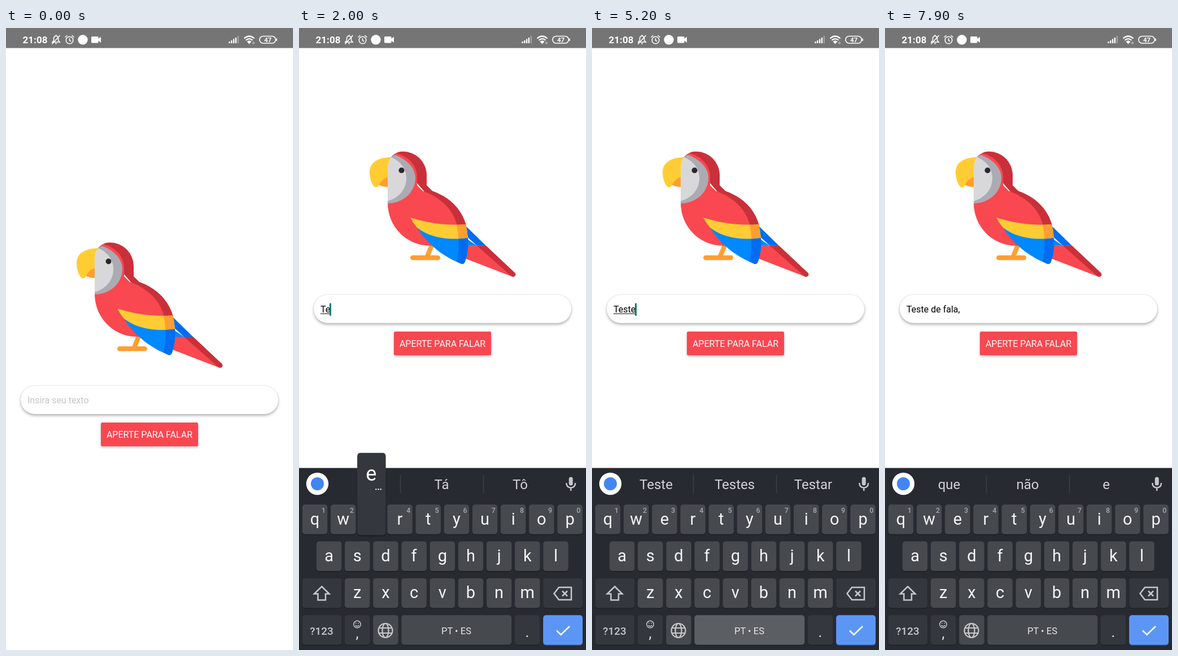
An HTML page that plays this animation: 508 by 1102 pixels, repeating every 8000 ms.

```html
<!DOCTYPE html>
<html lang="pt">
<head>
<meta charset="utf-8">
<title>Papagaio</title>
<style>
  html, body { margin: 0; width: 100%; height: 100%; overflow: hidden; background: #fff; }
  body { position: relative; font-family: Roboto, "Noto Sans", sans-serif; }
  svg { position: absolute; left: 0; top: 0; display: block; overflow: hidden; }
  #app { position: absolute; left: 0; top: 0; width: 508px; height: 1102px; }
  #field {
    position: absolute; left: 26px; top: 634px; width: 455.5px; height: 50px; box-sizing: border-box;
    padding-left: 12px; border-radius: 25px; background: #fff; white-space: pre;
    font-size: 16px; line-height: 52px; color: #000;
    box-shadow: 0 3px 5px rgba(0,0,0,.27), 0 0 3px rgba(0,0,0,.14);
  }
  #composing { text-decoration: underline 1px; text-underline-offset: 2px; }
  #hint { color: #c5c5c5; }
  #caret { position: absolute; top: 15px; width: 2.6px; height: 22px; background: #0b7d72; }
  #button {
    position: absolute; left: 168px; top: 698.5px; width: 172px; height: 42.5px; border-radius: 2.5px;
    background: #f94750; color: #fff; font-size: 16px; line-height: 43px; text-align: center; white-space: nowrap;
    box-shadow: 0 2px 4px rgba(0,0,0,.28);
  }
  text { text-anchor: middle; }
  .letter { font-size: 29px; fill: #f4f5f6; }
  .digit { font-size: 12.5px; font-weight: 500; fill: #a6a9ae; }
  .word { font-size: 24px; fill: #d0d2d5; }
  .line { fill: none; stroke: #c6c8cb; stroke-width: 2.5; }
  .white { fill: none; stroke: #fff; stroke-width: 1.6; }
</style>
</head>
<body>
<div id="app">
  <svg width="508" height="640">
    <!-- tail -->
    <path fill="#f94850" d="M290 547H331L382 595Q385 601 378 602L290 568Z"/>
    <path fill="#c9303a" d="M315 547H331L382 595Q385 598 382 601Q379 603 376 601Z"/>
    <path fill="#0088ff" d="M290 530L315 547H290Z"/>
    <path fill="#006df0" d="M292 509L331 547H315L292 526Z"/>
    <!-- leg -->
    <path fill="#ff9f30" d="M231 545H240L231 567H222Z"/>
    <rect fill="#ff9f30" x="197" y="564" width="53" height="8.6" rx="4.3"/>
    <!-- body -->
    <path fill="#c9303a" d="M163 390C169 383 176 380 184 380A42 42 0 0 1 226 422V440L236 450C267 461 288 482 296 511L280 520L170 390Z"/>
    <path fill="#f94850" d="M157 471C157 513 190 547 232 547H265L280 512C273 482 250 461 219 450L209 440V424C209 405 193 388 172 383Q167 386 162 391L157 440Z"/>
    <!-- face -->
    <path fill="#acabb3" d="M157 472C184 472 206 452 206 427C206 409 191 394 170 386Q165 388 162 391L157 440Z"/>
    <path fill="#d8d8da" d="M157 468V410C157 401 159 395 163 390C180 397 190 411 190 427C190 447 177 462 157 468Z"/>
    <circle fill="#29292c" cx="181.5" cy="413.5" r="5"/>
    <!-- beak -->
    <path fill="#ff9f30" d="M157 424C149 427 144 432 141 439Q149 443 157 443Z"/>
    <path fill="#ffcd33" d="M163 390C140 391 125 399 125 417C125 427 128 435 132 441Q136 446 141 441C144 433 150 427 157 425.500V410Q157 398 163 390Z"/>
    <!-- wing -->
    <path fill="#0088ff" d="M208 514C232 533 265 537 299 533C300 548 299 560 294 575Q291 582 285 578C255 566 228 545 208 514Z"/>
    <path fill="#006df0" d="M282 534L299 533C300 548 299 560 294 575Q291 582 285 578L279 575C282 562 283 550 282 534Z"/>
    <path fill="#ffcd33" d="M197 497C228 507 262 512 295 509Q298 520 299 533C265 538 232 533 209 515Q202 507 197 497Z"/>
    <path fill="#ff9f30" d="M279 510.500L295 509Q298 520 299 533L282 534.800Q282 522 279 510.500Z"/>
  </svg>
  <div id="field"><span id="done"></span><span id="composing"></span><span id="hint">Insira seu texto</span><i id="caret"></i></div>
  <div id="button">APERTE PARA FALAR</div>
</div>

<svg width="508" height="36">
  <rect width="508" height="35.500" fill="#757575"/>
  <text x="51.500" y="27" font-size="17" font-weight="600" fill="#fff">21:08</text>
  <!-- muted bell -->
  <path class="white" d="M82 25H95L92.500 22V18Q92 14.500 88.500 14Q85 14.500 84.500 18V22ZM88.500 14V12M87 27.500H90M95.500 13L81.500 28.500"/>
  <!-- alarm -->
  <circle class="white" cx="112.500" cy="21.500" r="6.300"/>
  <path class="white" d="M112.500 18V22L115 23.500M104.500 16.500L108.500 13M120.500 16.500L116.500 13"/>
  <circle cx="136" cy="20.800" r="8.700" fill="#fff"/>
  <path fill="#fff" d="M152.500 15H162Q163.500 15 163.500 16.500V19L168 15.500V26L163.500 22.500V25Q163.500 26.500 162 26.500H152.500Q151 26.500 151 25V16.500Q151 15 152.500 15Z"/>
  <!-- signal -->
  <path stroke="#fff" stroke-width="2.300" d="M395.500 27V24M399.300 27V22M403.100 27V19.500M406.900 27V17"/>
  <path stroke="#a5a5a5" stroke-width="2.300" d="M410.800 27V14"/>
  <!-- wifi -->
  <path fill="none" stroke="#fff" stroke-width="2.200" d="M421.500 18.500Q430.500 10.500 439.500 18.500M424.500 21.800Q430.500 16.500 436.500 21.800"/>
  <path fill="#fff" d="M426.500 24Q430.500 20.500 434.500 24L430.500 28.500Z"/>
  <circle cx="438" cy="26.500" r="1.500" fill="none" stroke="#ddd"/>
  <rect class="white" x="448.800" y="14.500" width="28.500" height="12.500" rx="6.200"/>
  <path stroke="#fff" stroke-width="1.600" d="M479 18.500V23"/>
  <text x="463.500" y="25" font-size="11.500" font-weight="600" fill="#fff">47</text>
</svg>

<svg width="508" height="1102">
  <g id="board">
    <rect y="779.500" width="508" height="325" fill="#282a31"/>
    <circle cx="32.500" cy="807.500" r="19.700" fill="#fff"/>
    <circle cx="32.500" cy="807.500" r="11.500" fill="#4285f4"/>
    <g fill="#c6c8cb">
      <rect x="477.700" y="795.500" width="7" height="15" rx="3.500"/>
      <path class="line" stroke-width="2" d="M473.300 806Q473.500 814.500 481.200 814.500Q488.900 814.500 489.100 806M481.200 814V820"/>
    </g>
    <g id="tools" fill="#a0a3a8">
      <path fill="none" stroke="#a0a3a8" stroke-width="2.500" d="M91.500 798.500H106.500Q109 798.500 109 801V810L102 817.500H91.500Q89.500 817.500 89.500 815.500V800.500Q89.500 798.500 91.500 798.500ZM109 810.500H104Q102 810.500 102 812.500V817M94 808.500Q98.500 814 103.500 808.500M93.500 804.500H96M101 804L104.500 803.500"/>
      <text x="171.500" y="814.500" font-size="19.500" font-weight="900">GIF</text>
      <circle cx="245.500" cy="808.500" r="6.300" fill="none" stroke="#a0a3a8" stroke-width="5"/>
      <circle cx="245.500" cy="808.500" r="9.500" fill="none" stroke="#a0a3a8" stroke-width="4" stroke-dasharray="5.500 4.450" stroke-dashoffset="2.700"/>
      <rect x="308" y="797.500" width="22" height="22" rx="2.500"/>
      <rect x="362.500" y="793" width="1.500" height="31" fill="#3c4047"/>
      <circle cx="400.500" cy="808" r="2.600"/><circle cx="408.700" cy="808" r="2.600"/><circle cx="416.900" cy="808" r="2.600"/>
    </g>
    <g id="words">
      <path stroke="#3c4047" stroke-width="1.500" d="M179.500 792V824M326.500 792V824"/>
      <text class="word" x="113.500" y="817"></text>
      <text class="word" x="252.500" y="817"></text>
      <text class="word" x="391.500" y="817"></text>
    </g>
    <g id="keys"></g>
    <path id="shift" class="line" d="M40.300 989.500L53.500 1002.500H47V1013.500H33.500V1002.500H27Z"/>
    <path class="line" d="M451.500 1002L460 991H482V1013H460ZM466 997.500L475 1006.500M475 997.500L466 1006.500"/>
    <circle class="line" style="stroke-width:1.500" cx="103" cy="1056.500" r="6.200"/>
    <path class="line" style="stroke-width:1.500" d="M99.700 1058Q103 1062 106.300 1058M100 1054.500H101.600M104.400 1054.500H106"/>
    <g class="line" style="stroke-width:2.200">
      <circle cx="153" cy="1067.500" r="12.500"/>
      <ellipse cx="153" cy="1067.500" rx="5.500" ry="12.500"/>
      <path d="M141.500 1063H164.500M141.500 1072H164.500"/>
    </g>
    <path fill="none" stroke="#fff" stroke-width="2.600" d="M456 1067.500L463.500 1075L479 1060"/>
    <g fill="#e6e7e9">
      <text x="40" y="1074.500" font-size="19" font-weight="500" fill="#c6c8cb">?123</text>
      <text x="103" y="1081" font-size="25">,</text>
      <text x="278.500" y="1073.500" font-size="16.500">PT • ES</text>
      <text x="404" y="1079" font-size="26">.</text>
    </g>
    <g id="popup">
      <rect width="50" height="147" y="1.500" rx="5" fill="#1f2126"/>
      <rect width="50" height="145.500" rx="5" fill="#34373d"/>
      <text x="24.500" y="49.500" font-size="36" fill="#fff"></text>
      <g fill="#e6e7e9"><circle cx="33" cy="64.500" r="1.200"/><circle cx="37.200" cy="64.500" r="1.200"/><circle cx="41.400" cy="64.500" r="1.200"/></g>
    </g>
  </g>
</svg>

<script>
const $ = id => document.getElementById(id);
const PITCH = 50.17, LIGHT = '#46494e', DARK = '#34383e';
const keys = {};

function add(tag, attrs, label = '') {
  const el = document.createElementNS('http://www.w3.org/2000/svg', tag);
  for (const k in attrs) el.setAttribute(k, attrs[k]);
  el.textContent = label;
  $('keys').append(el);
  return el;
}

function addKey(name, x, y, w, fill, shade = '#1e2025') {
  const box = { x, width: w, height: 52.5, rx: 5 };
  add('rect', { ...box, y: y + 1.6, fill: shade });
  keys[name] = { x, y, fill, rect: add('rect', { ...box, y, fill }) };
}

[['qwertyuiop', 5.8, 844.3], ['asdfghjkl', 30.9, 909.6], ['zxcvbnm', 81, 974.9]].forEach(([row, left, y], r) => {
  [...row].forEach((c, i) => {
    const x = left + i * PITCH;
    addKey(c, x, y, 44.5, LIGHT);
    keys[c].label = add('text', { class: 'letter', x: x + 22.2, y: y + 35.4 }, c);
    if (!r) add('text', { class: 'digit', x: x + 37.5, y: 858.5 }, (i + 1) % 10);
  });
});
addKey('shift', 5.8, 974.9, 69.5, DARK);
addKey('back', 432.2, 974.9, 69.8, DARK);
addKey('num', 5.8, 1040.2, 69.5, DARK);
addKey(',', 81, 1040.2, 44.5, DARK);
addKey('globe', 131.2, 1040.2, 44.5, LIGHT);
addKey(' ', 181.3, 1040.2, 195, LIGHT);
addKey('.', 382, 1040.2, 44.5, DARK);
addKey('enter', 432.2, 1040.2, 69.8, '#5c96f5', '#2f4c7e');

// time, committed text, composing text, suggestions, pressed key
const steps = [
  [0, '', '', '', ''],
  [1700, '', 'T', '', 't'],
  [1800, '', 'T', 'T Tá Tô', ''],
  [2000, '', 'Te', 'T Tá Tô', 'e'],
  [2100, '', 'Te', 'Te Tem Ter', ''],
  [2200, '', 'Tea', 'Te Tem Ter', 'a'],
  [2300, '', 'Tea', 'Tea Teatro Tear', ''],
  [2400, '', 'Te', 'Te Tem Ter', 'back'],
  [2500, '', 'Tes', 'Te Tem Ter', 's'],
  [2600, '', 'Test', 'Tes Test Teste', 't'],
  [2700, '', 'Test', 'Test Teste Testes', ' '],
  [2800, '', 'Test', 'Test Teste Testes', ''],
  [3000, 'Test ', '', 'y de que', ''],
  [3400, 'Test ', 'l', 'y de que', 'l'],
  [3500, 'Test ', 'l', 'l la los', ''],
  [3700, 'Test ', 'le', 'l la los', 'e'],
  [3800, 'Test ', 'le', 'le les leer', ''],
  [4000, 'Test ', 'le', 'le les leer', ' '],
  [4100, 'Test le ', '', 'adjunto envío rogamos', ''],
  [4200, 'Test le ', '', 'adjunto envío rogamos', 'back'],
  [4300, 'Test ', 'le', 'le les leer', 'back'],
  [4500, 'Test ', 'l', 'l la los', 'back'],
  [4600, 'Test ', '', 'y de que', 'back'],
  [4700, '', 'Test', 'y de que', 'back'],
  [4900, '', 'Test', 'Test Teste Testes', ''],
  [5100, '', 'Teste', 'Test Teste Testes', 'e'],
  [5200, '', 'Teste', 'Teste Testes Testar', ' '],
  [5300, 'Teste ', '', 'y de que', ''],
  [5400, 'Teste ', 'd', 'y de que', 'd'],
  [5500, 'Teste ', 'de', 'd de do', 'e'],
  [5600, 'Teste ', 'de', 'de del desde', ' '],
  [5700, 'Teste ', 'de', 'de del desde', ''],
  [5900, 'Teste de ', '', 'embarazo la sangre', ''],
  [6100, 'Teste de ', 'fa', 'fa familia factura', ''],
  [6200, 'Teste de ', 'fal', 'fa familia factura', 'l'],
  [6300, 'Teste de ', 'fal', 'fal falta fala', ''],
  [6400, 'Teste de ', 'fala', 'fal falta fala', 'a'],
  [6500, 'Teste de ', 'fala', 'fala falar falam', ''],
  [7000, 'Teste de fala,', '', 'fala falar falam', ','],
  [7100, 'Teste de fala,', '', 'que não e', ''],
  [7200, 'Teste de fala,', '', 'que não e', ' '],
  [7300, 'Teste de fala, ', '', 'que não e', '']
];

const show = (el, on) => { el.style.display = on ? '' : 'none'; };
const caretOn = t => (t >= 500 && t < 1400) || (t >= 1700 && t < 7800);

function draw(t) {
  const [, done, composing, words, pressed] = steps.filter(s => s[0] <= t).pop();
  const caps = t < 1800, open = t >= 1000;
  const casing = c => caps ? c.toUpperCase() : c;

  $('app').style.transform = `translateY(${open ? -161.3 : 0}px)`;
  show($('board'), open);
  const rest = Math.max(0, 1 - (t - 1000) / 350);
  $('board').setAttribute('transform', `translate(0 ${140.5 * rest ** 3})`);

  $('done').textContent = done;
  $('composing').textContent = composing;
  const empty = !(done + composing);
  show($('hint'), empty);
  show($('caret'), caretOn(t));
  const end = $('field').getBoundingClientRect().left;
  $('caret').style.left = (empty ? 12 : $('composing').getBoundingClientRect().right - end - 1.3) + 'px';

  show($('tools'), !words);
  show($('words'), words);
  const list = words.split(' ');
  $('words').querySelectorAll('text').forEach((el, i) => { el.textContent = list[i] || ''; });

  for (const c in keys) {
    const k = keys[c];
    const lit = c === ' ' ? '#5b5e63' : LIGHT;
    k.rect.setAttribute('fill', c === pressed && !k.label ? lit : k.fill);
    if (k.label) k.label.textContent = casing(c);
  }
  $('shift').style.fill = caps ? '#c6c8cb' : 'none';

  const key = keys[pressed];
  const popped = !!(key && key.label);
  show($('popup'), popped);
  if (popped) {
    $('popup').setAttribute('transform', `translate(${key.x - 2.8} ${key.y - 91.5})`);
    $('popup').querySelector('text').textContent = casing(pressed);
  }
}

const start = performance.now();
let last = -1;
function tick() {
  const t = Math.floor((performance.now() - start) % 8000 / 100) * 100;
  if (t !== last) draw(last = t);
  requestAnimationFrame(tick);
}
tick();
</script>
</body>
</html>
```
